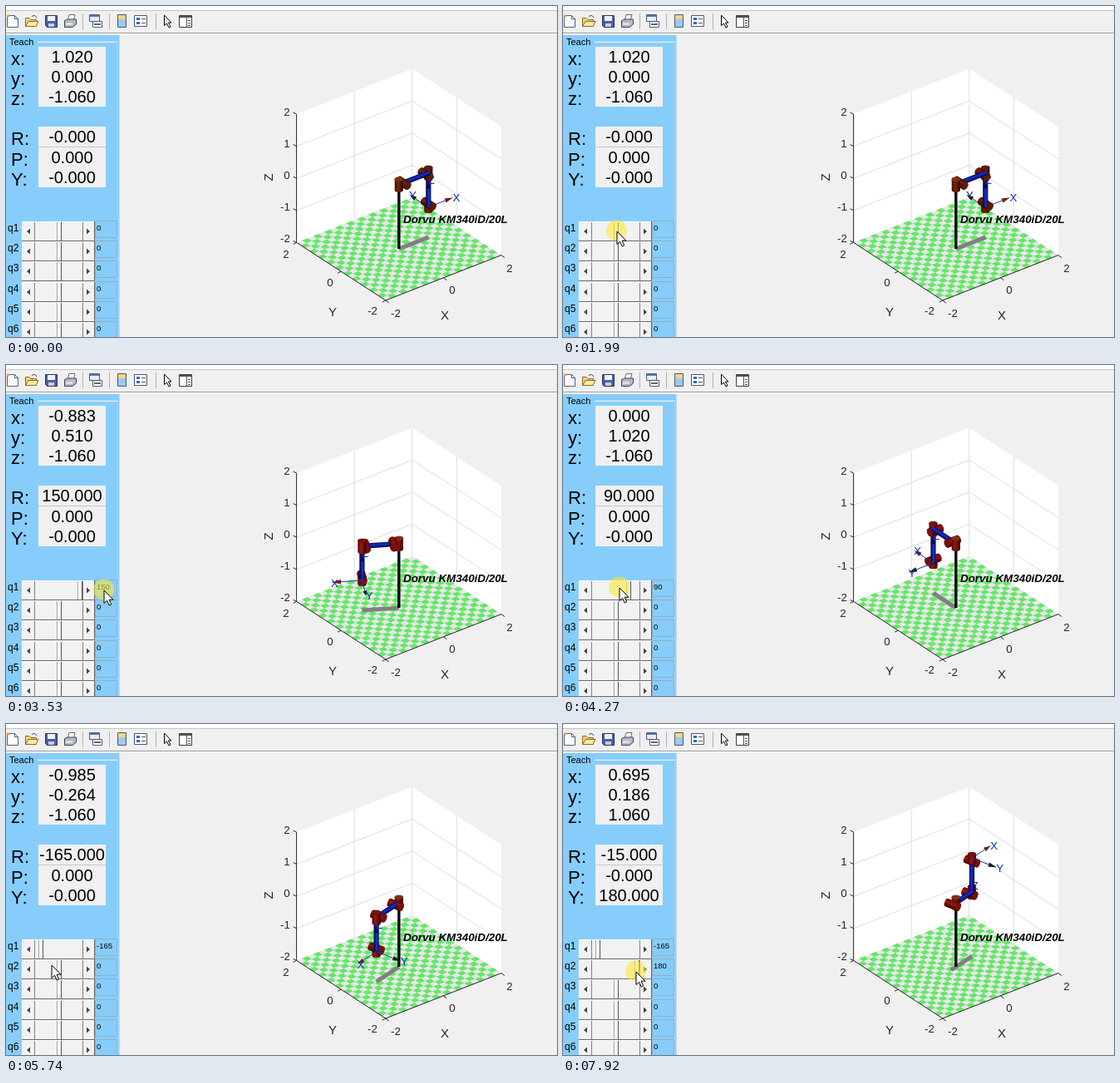
Recreate the animation shown at these times as an HTML page. Size 663 by 398 pixels, loop 7.99 s.

```html
<!DOCTYPE html>
<html lang="en">
<head>
<meta charset="utf-8">
<title>Robot teach panel</title>
<style>
html, body { margin: 0; width: 663px; height: 398px; overflow: hidden; background: #f0f0f0; }
svg { display: block; font-family: "Liberation Sans", Arial, sans-serif; }
.tick { font-size: 13.3px; fill: #262626; text-anchor: middle; }
.axis { font-size: 15px; fill: #262626; text-anchor: middle; }
.read { font-size: 20px; text-anchor: middle; }
.key { font-size: 22px; }
.joint { font-size: 12px; }
.val { font-size: 9.5px; }
.name { font: italic bold 13.4px "Liberation Sans", Arial, sans-serif; }
.tag { font-size: 13.3px; fill: #0c2cc4; }
</style>
</head>
<body>
<svg width="663" height="398" viewBox="0 0 663 398">
  <defs>
    <linearGradient id="brown" x2="0" y2="1">
      <stop offset="0" stop-color="#3c0e03"/><stop offset=".4" stop-color="#7a2409"/><stop offset="1" stop-color="#2c0802"/>
    </linearGradient>
    <linearGradient id="red" x2="0" y2="1">
      <stop offset="0" stop-color="#560606"/><stop offset=".4" stop-color="#98170f"/><stop offset="1" stop-color="#380303"/>
    </linearGradient>
    <linearGradient id="blue" x2="0" y2="1">
      <stop offset="0" stop-color="#040a60"/><stop offset=".4" stop-color="#1730d4"/><stop offset="1" stop-color="#020238"/>
    </linearGradient>
  </defs>
  <rect width="663" height="398" fill="#f0f0f0"/>
  <g id="bar">
    <path d="M0 0H663V5H0Z" fill="#fff"/><path d="M0 5.5H663" stroke="#c4c4c4"/>
    <path d="M0 32.5H663" stroke="#9a9a9a"/><path d="M0 33.5H663" stroke="#fff"/>
    <path d="M92.5 9V28M124.5 9V28M180.5 9V28" stroke="#b0b0b0"/>
    <path d="M1.5 11.5H10.5L14.5 15.5V25.5H1.5Z" fill="#fdfdff" stroke="#50607c"/>
    <path d="M10.5 11.5V15.5H14.5" fill="none" stroke="#50607c"/><circle cx="2.5" cy="12" r="1.8" fill="#e8a33a"/>
    <path d="M23.5 24.5V14.5H28L30 16.5H36.5V24.5Z" fill="#f0d27a" stroke="#8a6b22"/>
    <path d="M23.5 24.5L27 18.5H39L36 24.5Z" fill="#fbe9a6" stroke="#8a6b22"/><path d="M31 12.5Q35 10 37 14" fill="none" stroke="#444"/>
    <path d="M47.5 11.5H61.5V25.5H49.5L47.5 23.5Z" fill="#4b5f9e" stroke="#28345f"/>
    <path d="M50 12H59V18H50Z" fill="#eef2fa"/><path d="M51 21H58V25H51Z" fill="#c9cedd"/>
    <path d="M74 18L76 10.5H83L81 18Z" fill="#fff" stroke="#667"/>
    <path d="M70.5 17.5L74 16H84.5V22L80 25.5H70.5Z" fill="#b4b9c6" stroke="#3f4554"/><path d="M72 21.5H80" stroke="#eee" stroke-width="2"/>
    <path d="M100.5 10.5H112.5V18.5H100.5Z" fill="#e8edf7" stroke="#4b5a78"/><path d="M101 12H112" stroke="#5577b8" stroke-width="2"/>
    <path d="M104.5 18.5H115.5V25.5H104.5Z" fill="#fff" stroke="#4b5a78"/><path d="M106 22H114" stroke="#666" stroke-width="2"/>
    <path d="M134.5 10.5H144.5V25.5H134.5Z" fill="#9cc8f2" stroke="#4a5672"/><path d="M135 11H144V16H135Z" fill="#f5d487"/>
    <path d="M154.5 11.5H169.5V24.5H154.5Z" fill="#fff" stroke="#4a5672"/>
    <path d="M157 14H161V17H157ZM157 19H161V22H157Z" fill="#3f62b6"/><path d="M163 15.5H168M163 20.5H168" stroke="#555"/>
    <path d="M190.5 11V23.5L193.5 21L196 26L198 25L195.5 20H199Z" fill="#fff" stroke="#000"/>
    <path d="M208.5 11.5H223.5V25.5H208.5Z" fill="#fff" stroke="#3c3c3c"/><path d="M209 13H223" stroke="#555" stroke-width="2"/>
    <path d="M217.5 14V25M219 17.5H222M219 20.5H222M219 23.5H222" stroke="#555"/>
  </g>
  <path d="M0 35H136.5V398H0Z" fill="#87cdfb"/>
  <path d="M38 43.5H134" fill="none" stroke="#e4f3ff"/><path d="M38 42.5H134.5V398" fill="none" stroke="#a9d3ee"/>
  <text x="4" y="47" font-size="11">Teach</text>
  <path d="M39 49H120V121H39ZM39 145H120V218H39Z" fill="#f0f0f0"/><path d="M39 169.5H120" stroke="#c8c8c8"/>
  <path d="M19 259H106V398H19Z" fill="#f2f2f2"/>
  <g id="panel"></g>
  <g id="plot"></g>
  <g id="robot"></g>
  <g id="mouse">
    <circle id="halo" r="12.5" cx="-.5" cy="-1" fill="#fbe83a" opacity=".6"/>
    <path d="M0 0V15.5L3.6 12.2L6.2 18L8.7 16.9L6.1 11.2H11Z" fill="#fff" stroke="#000"/>
  </g>
</svg>
<script>
const LOOP = 7990, STEP = 66.6, DEG = Math.PI / 180;
const $ = id => document.getElementById(id);
const f1 = v => v.toFixed(1);

// Steps: [tick, value]
const Q1 = [[0, 0], [31, 15], [33, 30], [35, 60], [37, 90], [39, 120], [41, 150], [54, 135], [57, 120], [61, 90],
  [65, 45], [67, 0], [69, -45], [71, -90], [74, -135], [76, -165]];
const Q2 = [[0, 0], [95, 30], [97, 75], [100, 90], [102, 105], [104, 120], [106, 135], [108, 150], [109, 180]];
// Pointer path: [tick, x, y]
const PATH = [[6, 580, 378], [8, 430, 345], [11, 235, 310], [14, 110, 290], [17, 71, 283], [21, 65, 271], [30, 65, 271],
  [41, 103, 271], [46, 117, 270], [50, 118, 271], [53, 118, 271], [64, 68, 268], [71, 51, 268], [76, 42, 268],
  [82, 42, 268], [86, 55, 290], [89, 64, 297], [93, 64, 297], [99, 77, 297], [104, 83, 298], [111, 87, 298],
  [118, 87, 298], [119, 88, 298]];

const held = (steps, n) => steps.filter(s => s[0] <= n).pop()[1];
function along(path, n) {
  const i = path.findIndex(k => k[0] >= n);
  if (i < 1) return path[i < 0 ? path.length - 1 : 0].slice(1);
  const a = path[i - 1], b = path[i], u = (n - a[0]) / (b[0] - a[0]);
  return [a[1] + (b[1] - a[1]) * u, a[2] + (b[2] - a[2]) * u];
}

// Orthographic view of the plot box
const vec = ([x, y, z]) => [34.8 * x - 26.8 * y, -13.6 * x - 17.4 * y - 38.6 * z];
const proj = p => { const [x, y] = vec(p); return [472.8 + x, 214.8 + y]; };
const depth = ([x, y, z]) => -.544 * x - .683 * y + .49 * z;
const pts = list => 'M' + list.map(p => proj(p).map(f1).join(' ')).join('L');
const path = (list, attrs) => `<path d="${pts(list)}" ${attrs}/>`;
const text = (x, y, cls, s, more = '') => `<text x="${f1(x)}" y="${f1(y)}" class="${cls}" ${more}>${s}</text>`;

function drawPlot() {
  const A = 2, B = -2, N = 21, t = 4 / N, white = 'fill="#fff"', grid = 'fill="none" stroke="#dedede"';
  let s = path([[B, A, B], [A, A, B], [A, A, A], [B, A, A]], white) + path([[A, A, B], [A, B, B], [A, B, A], [A, A, A]], white)
    + path([[B, B, B], [A, B, B], [A, A, B], [B, A, B]], 'fill="#e7e7e7"');
  let tiles = '';
  for (let i = 0; i < N; i++) for (let j = 1 - i % 2; j < N; j += 2) {
    const x = i * t - 2, y = j * t - 2;
    tiles += pts([[x, y, B], [x + t, y, B], [x + t, y + t, B], [x, y + t, B]]) + 'Z';
  }
  s += `<path d="${tiles}" fill="#66e66a"/>`;
  for (const z of [-1, 0, 1]) s += path([[B, A, z], [A, A, z], [A, B, z]], grid);
  s += path([[0, A, B], [0, A, A]], grid) + path([[A, 0, B], [A, 0, A]], grid) + path([[A, A, B], [A, A, A]], grid);
  s += path([[B, A, A], [B, A, B], [B, B, B], [A, B, B]], 'fill="none" stroke="#262626"');
  const mark = (p, dx, dy) => {
    const [x, y] = proj(p);
    s += `<path d="M${f1(x)} ${f1(y)}l${dx} ${dy}" stroke="#262626"/>`;
  };
  for (let v = -2; v <= 2; v++) {
    mark([B, A, v], -4, -2);
    s += text(v < 0 ? 336 : 338, 208 - 38 * v, 'tick', v);
  }
  for (const v of [-2, 0, 2]) { mark([B, v, B], -4, 2); mark([v, B, B], 4, 3); }
  s += text(337, 303, 'tick', 2) + text(390, 337, 'tick', 0) + text(441, 371, 'tick', -2)
    + text(469, 374, 'tick', -2) + text(537, 346, 'tick', 0) + text(606, 320, 'tick', 2)
    + text(393, 373, 'axis', 'Y') + text(528, 377, 'axis', 'X')
    + text(0, 0, 'axis', 'Z', 'transform="translate(321 206) rotate(-90)"');
  $('plot').innerHTML = s;
}

function cylinder(p, a, half, radius, paint, cap) {
  const [x, y] = proj(p), [ux, uy] = vec(a), w = f1(radius * 44.2), d = depth(a);
  const flip = ux < 0 ? -1 : 1, L = Math.hypot(ux, uy) * half, m = f1(w * Math.abs(d) + .1);
  const turn = Math.atan2(uy * flip, ux * flip) / DEG, end = d * flip > 0 ? L : -L;
  return `<g transform="translate(${f1(x)} ${f1(y)}) rotate(${f1(turn)})">
    <path d="M${-L} ${-w}A${m} ${w} 0 0 0 ${-L} ${w}L${L} ${w}A${m} ${w} 0 0 0 ${L} ${-w}Z" fill="url(#${paint})"/>
    <ellipse cx="${end}" rx="${m}" ry="${w}" fill="${cap}"/></g>`;
}

function drawRobot(q1, q2, n) {
  const c1 = Math.cos(q1 * DEG), s1 = Math.sin(q1 * DEG), c = Math.cos(q2 * DEG), s = Math.sin(q2 * DEG);
  const at = (r, z) => [r * c1, r * s1, z];
  const arm = k => at(.15 + k * c, -k * s);
  const fore = k => at(.15 + .87 * c - k * s, -.87 * s - k * c);
  const up = [0, 0, 1], side = [-s1, c1, 0], out = at(c, -s), tall = at(s, c);
  const parts = [], add = (d, svg) => parts.push([d, svg]);
  const paint = n < 31 ? 'brown' : 'red', cap = n < 31 ? '#5e1b08' : '#74110b';

  const link = (a, b) => {
    const mid = a.map((v, i) => (v + b[i]) / 2), len = Math.hypot(...a.map((v, i) => b[i] - v));
    add(depth(mid), cylinder(mid, a.map((v, i) => (b[i] - v) / len), len / 2, .07, 'blue', '#0a1880'));
  };
  const joint = (p, a, half, top = cap) => add(depth(p) + .06, cylinder(p, a, half, .115, paint, top));

  link(at(0, 0), arm(0));
  link(arm(0), arm(.87));
  link(fore(0), fore(1));
  joint(at(0, 0), up, .17, '#7d3210');
  joint(arm(0), side, .2);
  joint(arm(.77), side, .2);
  joint(fore(0), tall, .17);
  joint(fore(.96), side, .2);
  joint(fore(1.06), tall, .12);
  add(-.5, path([[0, 0, -2], [0, 0, -.15]], 'stroke="#0a0a0a" stroke-width="3.4"'));
  add(0, text(478, 261, 'name', 'Dorvu KM340iD/20L'));

  const tool = fore(1.06);
  [['X', out, '#6e2012'], ['Y', side, '#0c2210'], ['Z', tall, '#0c0c4c']].forEach(([label, a, color]) => {
    const reach = k => proj(tool.map((v, i) => v + a[i] * k));
    const [bx, by] = reach(.58), [tx, ty] = reach(.85), [ox, oy] = reach(0);
    const len = Math.hypot(tx - bx, ty - by) || 1, nx = (by - ty) / len * 2.7, ny = (tx - bx) / len * 2.7;
    add(depth(tool) + .85 * depth(a), `<path d="M${f1(ox)} ${f1(oy)}L${f1(bx)} ${f1(by)}" stroke="#1838b8"/>
      <path d="M${f1(tx)} ${f1(ty)}L${f1(bx + nx)} ${f1(by + ny)}L${f1(bx - nx)} ${f1(by - ny)}Z" fill="${color}"/>`
      + text(tx - .5, ty + 5, 'tag', label));
  });

  const floor = p => [p[0], p[1], -2];
  const shadow = path([at(0, 0), arm(0), arm(.87), fore(1.06)].map(floor),
    'fill="none" stroke="#808080" stroke-width="5" stroke-linejoin="round"');
  parts.sort((a, b) => a[0] - b[0]);
  $('robot').innerHTML = shadow + parts.map(p => p[1]).join('');
}

// Tool position and roll, pitch, yaw
function pose(q1, q2) {
  const a = q1 * DEG, b = q2 * DEG, r = .15 + .87 * Math.cos(b) - 1.06 * Math.sin(b), tiny = 1e-9;
  return [r * Math.cos(a), r * Math.sin(a), -.87 * Math.sin(b) - 1.06 * Math.cos(b),
    Math.atan2(Math.sin(a), Math.cos(a) * Math.cos(b)) / DEG - tiny,
    Math.asin(Math.cos(a) * Math.sin(b)) / DEG,
    Math.atan2(-Math.sin(a) * Math.sin(b), Math.cos(b)) / DEG - tiny];
}

function slider(i, q) {
  const y = Math.round(259 + 24.2 * i), x = Math.round(Math.min(88.5, 64 + q * (q > 0 ? .165 : .136)));
  return `<path d="M19.5 ${y + 23}V${y + .5}H106" fill="none" stroke="#fff"/>
    <path d="M19 ${y + 23.5}H106.5V${y}" fill="none" stroke="#666"/>
    <path d="M34.5 ${y + 1}V${y + 23}M92.5 ${y + 1}V${y + 23}" stroke="#808080"/>
    <path d="M${x - 2.5} ${y + 1}V${y + 23}" stroke="#a2a2a2"/><path d="M${x - 1.5} ${y + 1}V${y + 23}" stroke="#fff"/>
    <path d="M${x + 2.5} ${y + 1}V${y + 23}" stroke="#555"/>
    <path d="M29 ${y + 8.5}V${y + 15.5}L25 ${y + 12}ZM97 ${y + 8.5}V${y + 15.5}L101 ${y + 12}Z" fill="#444"/>
    <path d="M107.5 ${y + 19.5}V${y - .5}H133.5V${y + 19.5}Z" fill="#87cdfb" stroke="#8fb0c6"/>`
    + text(2, y + 12, 'joint', 'q' + (i + 1)) + text(109, y + 11, 'val', q);
}

function drawPanel(q1, q2, shown) {
  let s = '';
  shown.forEach((v, i) => {
    const y = [68, 92, 116, 164, 189, 213][i];
    s += text(6, y + 3, 'key', 'xyzRPY'[i] + ':') + text(79.5, y, 'read', v.toFixed(3));
  });
  [q1, q2, 0, 0, 0, 0].forEach((q, i) => { s += slider(i, q); });
  $('panel').innerHTML = s;
}

let last = -1;
function render(now) {
  const n = Math.floor((now % LOOP + 20) / STEP);
  if (n !== last) {
    last = n;
    // The readings trail the arm by two ticks
    const before = Math.max(0, n - 2);
    drawPanel(held(Q1, n), held(Q2, n), pose(held(Q1, before), held(Q2, before)));
    drawRobot(held(Q1, n), held(Q2, n), n);
    const [x, y] = along(PATH, n);
    $('mouse').setAttribute('transform', `translate(${f1(x)} ${f1(y)})`);
    $('mouse').style.display = n < 6 ? 'none' : '';
    $('halo').style.display = n >= 30 && n < 82 || n >= 93 ? '' : 'none';
  }
  requestAnimationFrame(render);
}

drawPlot();
render(0);
</script>
</body>
</html>
```
